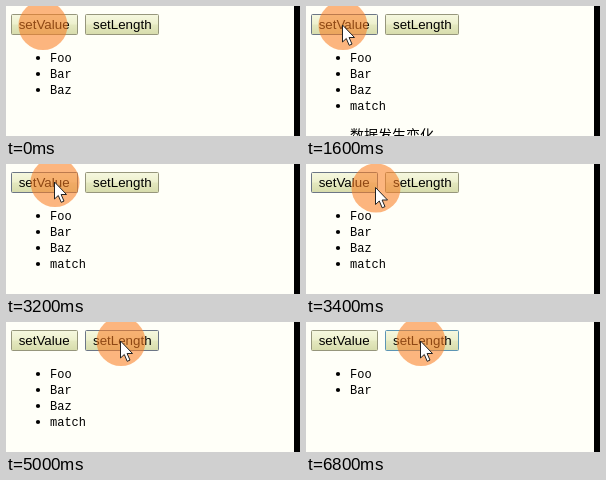
Write an HTML page that moves like this. It is 294x130 px and loops after 7.2 s.

```html
<!DOCTYPE html>
<html lang="en">
<head>
<meta charset="utf-8">
<title>List demo</title>
<style>
  html, body { margin: 0; width: 100%; height: 100%; overflow: hidden; background: #fffff8; }
  svg { display: block; width: 294px; height: 130px; }
  .button rect { fill: url(#face); stroke: #96967c; }
  .button text { font: 13.33px "Liberation Sans", Arial, sans-serif; }
  .button.focus rect { stroke: #6c7686; }
  #setLength.active rect { stroke: #5c95b4; }
  .item text { font: 12px "Liberation Mono", monospace; }
  #message { font: 300 14px "Noto Sans CJK SC", "Noto Sans CJK", sans-serif; }
  #halo { fill: #fa7d23; fill-opacity: .57; }
  #arrow { fill: #fff; stroke: #222; stroke-width: 1; stroke-linejoin: round; }
</style>
</head>
<body>
<svg viewBox="0 0 294 130">
  <defs>
    <linearGradient id="face" x2="0" y2="1">
      <stop offset="0" stop-color="#f6f8e0"/>
      <stop offset=".48" stop-color="#edf0cd"/>
      <stop offset=".52" stop-color="#e4e8bf"/>
      <stop offset="1" stop-color="#d7dcac"/>
    </linearGradient>
  </defs>
  <g id="setValue" class="button">
    <rect x="5.5" y="8.5" width="66" height="20" rx="1"/>
    <text x="12.7" y="23">setValue</text>
  </g>
  <g id="setLength" class="button">
    <rect x="79.5" y="8.5" width="73" height="20" rx="1"/>
    <text x="87" y="23">setLength</text>
  </g>
  <g id="list"></g>
  <text id="message" x="44" y="102">数据发生变化</text>
  <g id="pointer">
    <circle id="halo" r="24.5"/>
    <path id="arrow" d="M-.5-.5V16.5L3.3 13 6.2 19.8 9 18.6 6.1 12H11.5Z"/>
  </g>
  <rect x="288" width="6" height="130"/>
</svg>
<script>
const LOOP = 7200, TICK = 200, LINE = 16;
const byId = id => document.getElementById(id);

byId('list').innerHTML = ['Foo', 'Bar', 'Baz', 'match'].map((word, i) =>
  `<g class="item" transform="translate(0 ${i * LINE})">
    <circle cx="32" cy="52" r="2.1"/><text x="44" y="56">${word}</text></g>`).join('');
const items = document.querySelectorAll('.item');

// Each track holds [start time, value] steps.
const tracks = {
  pointer: [[0, [37, 19.5]], [3200, [49, 18.5]], [3400, [70, 24]], [3600, [95, 25]], [3800, [115, 19.5]]],
  arrow: [[0, false], [1000, true]],
  count: [[0, 3], [1600, 4], [5200, 2]],
  message: [[0, false], [1600, true], [2600, false], [5200, true], [6200, false]],
  focus: [[0, ''], [1400, 'setValue'], [3600, 'setLength']],
  active: [[0, false], [6400, true]]
};
const valueAt = (name, time) => tracks[name].findLast(([start]) => start <= time)[1];
const show = (node, visible) => node.setAttribute('visibility', visible ? 'visible' : 'hidden');

function draw(now) {
  const time = Math.floor(now % LOOP / TICK) * TICK;
  const count = valueAt('count', time), focus = valueAt('focus', time);
  items.forEach((item, i) => show(item, i < count));
  show(byId('message'), valueAt('message', time));
  byId('message').setAttribute('y', 70 + count * LINE);
  byId('pointer').setAttribute('transform', `translate(${valueAt('pointer', time)})`);
  show(byId('arrow'), valueAt('arrow', time));
  for (const id of ['setValue', 'setLength']) byId(id).classList.toggle('focus', id === focus);
  byId('setLength').classList.toggle('active', valueAt('active', time));
}

const begin = performance.now();
function frame() {
  draw(performance.now() - begin);
  requestAnimationFrame(frame);
}
frame();
</script>
</body>
</html>
```
